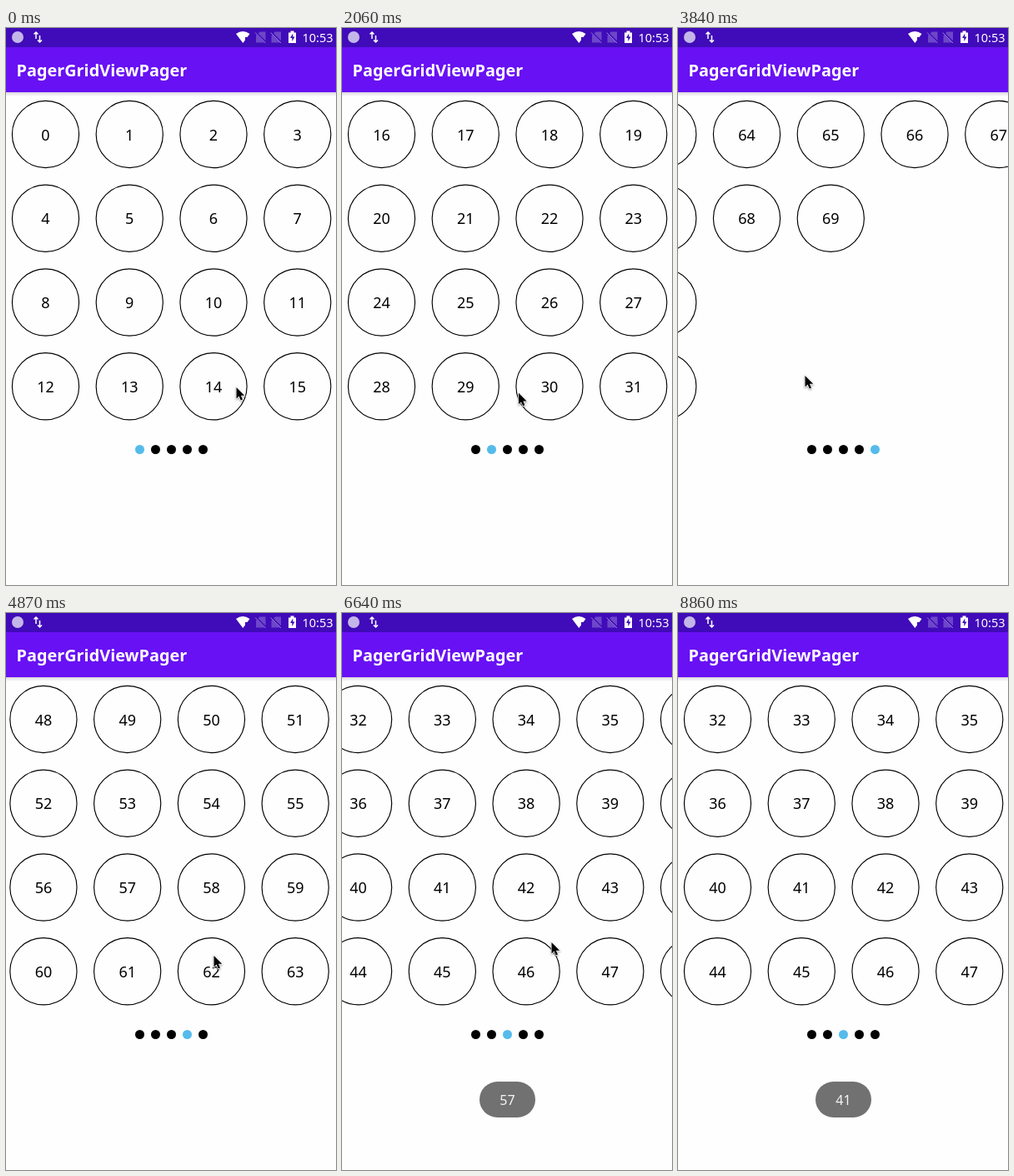
These frames come from a looping animation (396x668 px, 9100 ms). An HTML page:

```html
<!DOCTYPE html>
<html lang="en">
<head>
<meta charset="utf-8">
<title>PagerGridViewPager</title>
<style>
  html, body { margin: 0; width: 100%; height: 100%; overflow: hidden; background: #fefefe; }
  svg { display: block; font-family: "Noto Sans", sans-serif; }
  .cell circle { fill: none; stroke: #000; stroke-width: 1.15; }
  .cell text { font-size: 18px; text-anchor: middle; }
</style>
</head>
<body>
<svg width="396" height="668" viewBox="0 0 396 668">
  <defs>
    <linearGradient id="shade" x2="0" y2="1">
      <stop stop-color="#d9d6df"/>
      <stop offset="1" stop-color="#fefefe"/>
    </linearGradient>
  </defs>
  <rect width="396" height="668" fill="#fefefe"/>
  <rect y="77" width="396" height="5" fill="url(#shade)"/>
  <g id="pager"></g>
  <g id="dots"></g>

  <rect y="23" width="396" height="54" fill="#6811f4"/>
  <text x="12.5" y="57.5" font-size="19.85" font-weight="700" fill="#fff">PagerGridViewPager</text>

  <rect width="396" height="23" fill="#400bb8"/>
  <circle cx="14" cy="11" r="7" fill="#c4b6e9"/>
  <path d="M36 5v8M33.5 7.5l2.5-2.5 2.5 2.5M40.5 9v8M38 14.5l2.5 2.5 2.5-2.5"
    fill="none" stroke="#fff" stroke-width="1.5"/>
  <path d="M276 7Q284 1 292.5 7L289.500 11H287V14.500L284.300 18Z" fill="#fff"/>
  <g id="sim">
    <path d="M300 9L304.500 4.500H311.500V17.500H300Z" fill="#6d46c9"/>
    <path d="M299 4.500L312.500 18" stroke="#400bb8" stroke-width="2.400"/>
    <path d="M299 5.500L311.500 18" stroke="#9a7cdc"/>
  </g>
  <use href="#sim" x="18.5"/>
  <path d="M339 5.500h2.500v-2h4v2h2.500v12.500h-9z" fill="#fff"/>
  <path d="M344.300 6.500l-3.300 5.500h2.300v4l3.200-5.500h-2.200z" fill="#400bb8"/>
  <text x="355.5" y="16.5" font-size="14.5" fill="#fff">10:53</text>

  <g id="toast">
    <rect x="165" y="562" width="67" height="43" rx="21.5" fill="#717171"/>
    <text x="198.5" y="589.7" font-size="16" fill="#f4f4f4" text-anchor="middle"></text>
  </g>
  <path id="cursor" d="M.5 0V13.500L3.600 10.600L5.700 15.500L8 14.500L5.900 9.700H10.200Z"
    stroke="#fff" stroke-width="1.4" paint-order="stroke" style="filter: drop-shadow(0 1px 1px #0006)"/>
</svg>
<script>
const LOOP = 9100, STEP = 147.67, LAST = 60;
const PAGE_WIDTH = 403, CELL = 100.75, COUNT = 70;
const SETTLE = 4, REST = .72;
const $ = id => document.getElementById(id);

// Times are in steps. A tap is a swipe that stays in place.
const swipe = (press, release, page, x0, x1, y) => ({ press, release, page, x0, x1, y });
const tap = (press, release, page, x, y) => swipe(press, release, page, x, x, y);
const gestures = [
  tap(-1, 0, 0, 276, 431),
  swipe(4.2, 7, 1, 308, 211, 438),
  swipe(16.7, 17.7, 2, 286, 133, 412),
  swipe(21, 22, 3, 305, 152, 417),
  swipe(23.5, 24.7, 4, 305, 152, 417),
  swipe(29.5, 30.6, 3, 96, 249, 411),
  tap(36, 38, 3, 150, 335),
  swipe(42.4, 43.58, 2, 98, 251, 395),
  tap(49, 51, 2, 154, 329),
  tap(59, 60, 2, 352, 690)
];

const mix = (a, b, u) => a + (b - a) * u;
const progress = (a, b, t) => Math.min(1, Math.max(0, (t - a) / (b - a)));
const easeOut = u => 1 - (1 - u) ** 5;

function pose(step) {
  const i = gestures.findLastIndex(g => g.press <= step);
  const g = gestures[i], next = gestures[i + 1] || g;
  const from = i ? gestures[i - 1].page : 0;

  // The page follows the pointer, then glides to its place after release.
  const dragX = mix(g.x0, g.x1, progress(g.press, g.release, step));
  const dragged = from + (g.x0 - dragX) / PAGE_WIDTH;
  const page = mix(dragged, g.page, easeOut(progress(g.release, g.release + SETTLE, step)));

  // The pointer rests, then travels to the next press.
  const travel = progress(mix(g.release, next.press, REST), next.press, step);
  const moving = step > g.release && next !== g;
  return {
    page,
    x: moving ? mix(g.x1, next.x0, travel) : dragX,
    y: moving ? mix(g.y, next.y, travel) : g.y
  };
}

$("pager").innerHTML = Array.from({ length: COUNT }, (_, i) => {
  const x = 47.5 + Math.floor(i / 16) * PAGE_WIDTH + i % 4 * CELL;
  const y = 127.5 + Math.floor(i % 16 / 4) * CELL;
  return `<g class="cell" transform="translate(${x} ${y})"><circle r="40.1"/><text y="7">${i}</text></g>`;
}).join("");

$("dots").innerHTML = Array.from({ length: 5 }, (_, i) =>
  `<circle cx="${160.5 + 19 * i}" cy="505.5" r="5.5"/>`).join("");

function draw(now) {
  const step = Math.min(LAST, Math.floor((now % LOOP + 13) / STEP));
  const { page, x, y } = pose(step);
  $("pager").setAttribute("transform", `translate(${-page * PAGE_WIDTH})`);
  [...$("dots").children].forEach((dot, i) =>
    dot.setAttribute("fill", i === Math.round(page) ? "#55bbeb" : "#000"));
  $("cursor").setAttribute("transform", `translate(${x} ${y})`);
  $("toast").style.display = step < 39 ? "none" : "";
  $("toast").lastElementChild.textContent = step < 52 ? 57 : 41;
}

const start = performance.now();
function tick() {
  draw(performance.now() - start);
  requestAnimationFrame(tick);
}
tick();
</script>
</body>
</html>
```
